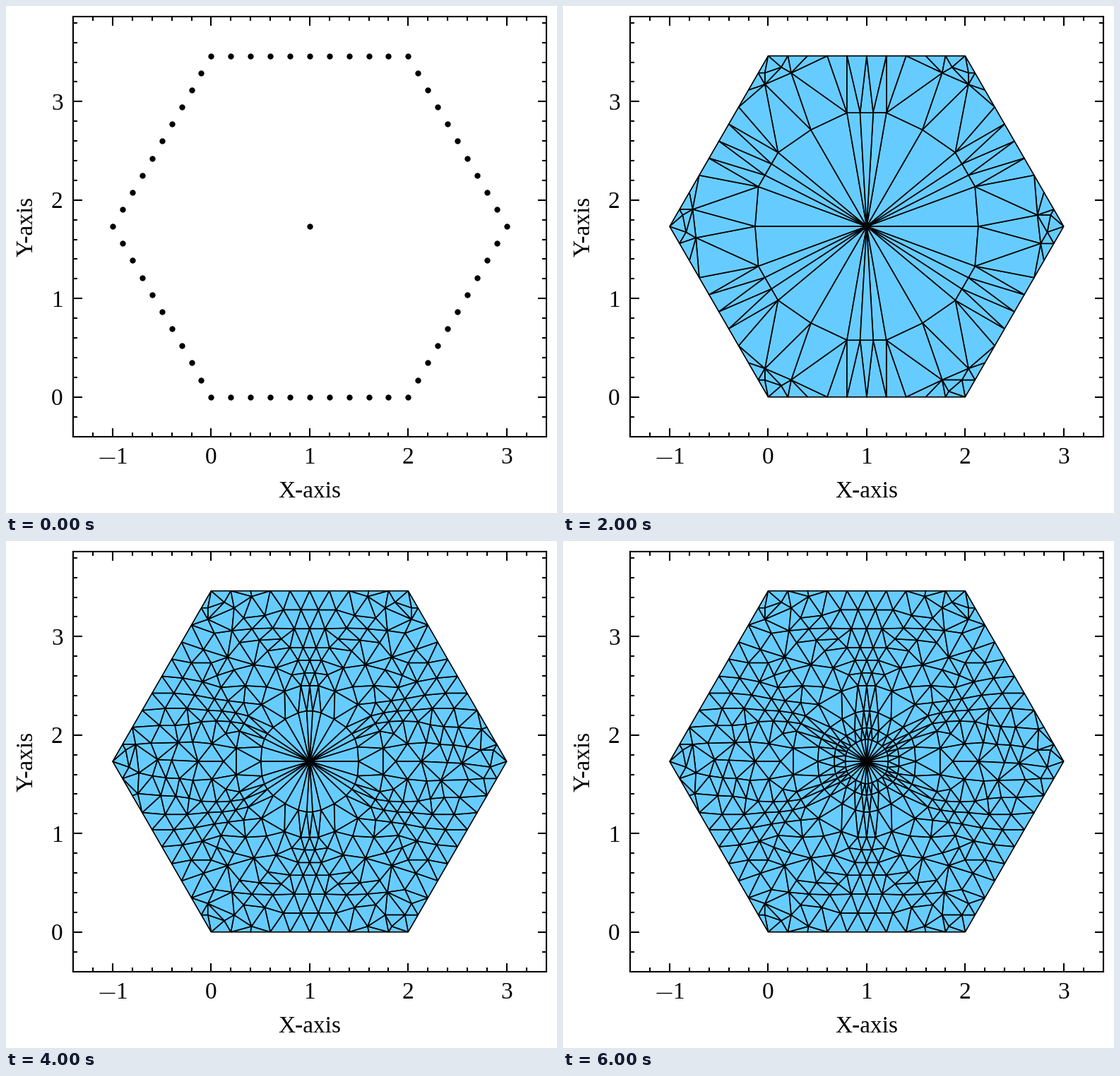
Animation of 780x718 px, one loop 7 s. Source, as a matplotlib script:

```python
import numpy as np
import matplotlib.pyplot as plt
from matplotlib.animation import FuncAnimation
from matplotlib.collections import PolyCollection
from matplotlib.lines import Line2D
from matplotlib.tri import Triangulation

W, H, DPI = 780, 718, 300
SCALE = 139.45            # pixels per data unit
LEFT, BOTTOM = 95.2, 609.5
ROOT3 = np.sqrt(3)
XLIM, YLIM = (-1.4, 3.4), (-0.4, 2 * ROOT3 + 0.4)
SPACING = 0.2
SIDE = 10                 # boundary points per hexagon side
# Diagonals chosen in the two tied trapezoids at each corner
DIAGONALS = ["--", "-+", "+-", "--", "++", "--"]


def seed_points():
    """Hexagon outline, bulged a hair so it stays strictly convex, and its centre."""
    angle = np.radians(240 + 60 * np.arange(7))
    corners = np.c_[1 + 2 * np.cos(angle), ROOT3 + 2 * np.sin(angle)]
    t = np.arange(SIDE)[:, None] / SIDE
    centre = np.array([1, ROOT3])
    sides = []
    for a, b in zip(corners[:-1], corners[1:]):
        out = (a + b) / 2 - centre
        sides.append(a + (b - a) * t + 1e-6 * out * t * (1 - t))
    return np.vstack(sides + [centre])


def first_mesh():
    """Fan around the centre, zigzag strips in the corners."""
    n = 6 * SIDE
    tris = []
    for k, choice in enumerate(DIAGONALS):
        c = k * SIDE

        def at(j):
            return (c + j) % n

        tris.append((at(0), at(1), at(-1)))
        for j, sign in enumerate(choice, start=1):
            s = 1 if sign == "+" else -1
            near, far = at(-s * j), at(s * (j + 1))
            tris.append((near, far, at(s * j)))
            tris.append((near, far, at(-s * (j + 1))))
        tris.append((n, at(-3), at(3)))
        tris += [(n, at(j), at(j + 1)) for j in range(3, 7)]
    return np.array(tris)


def refine(points, tris):
    """Add the centroid of each triangle that reaches too far, then triangulate."""
    corners = points[tris]
    mid = corners.mean(axis=1)
    reach = np.linalg.norm(corners - mid[:, None], axis=2).max(axis=1)
    points = np.vstack([points, mid[reach > SPACING]])
    return points, Triangulation(points[:, 0], points[:, 1]).triangles


points, tris = seed_points(), first_mesh()
seeds = points
meshes = [points[tris]]
for _ in range(5):
    points, tris = refine(points, tris)
    meshes.append(points[tris])

plt.rcParams["font.family"] = "Liberation Serif"
plt.rcParams["font.size"] = 8
fig = plt.figure(figsize=(W / DPI, H / DPI), dpi=DPI, facecolor="white")
width, height = SCALE * np.ptp(XLIM), SCALE * np.ptp(YLIM)
ax = fig.add_axes([LEFT / W, 1 - BOTTOM / H, width / W, height / H])
ax.set(xlim=XLIM, ylim=YLIM)
ax.set_xticks(range(-1, 4))
ax.set_yticks(range(4))
ax.set_xticks(np.arange(-6, 17) * 0.2, minor=True)
ax.set_yticks(np.arange(-1, 20) * 0.2, minor=True)
for kind, size in (("major", 3), ("minor", 1.5)):
    ax.tick_params(which=kind, direction="in", length=size, width=0.5,
                   top=True, right=True, labelbottom=False, labelleft=False)
for spine in ax.spines.values():
    spine.set_linewidth(0.5)


def label(x, y, text, **kw):
    fig.text(x / W, 1 - y / H, text, va="baseline", **{"ha": "center", **kw})


def px(x):
    return LEFT + (x - XLIM[0]) * SCALE


def py(y):
    return BOTTOM - (y - YLIM[0]) * SCALE


for v in range(4):
    label(px(v), 648, str(v))
    label(80.5, py(v) + 11.3, str(v), ha="right")
label(px(-1) + 12.8, 648, "1")
minus = np.array([131.5, 153.8]) / W
fig.add_artist(Line2D(minus, [1 - 639.5 / H] * 2, color="k", lw=0.34,
                      solid_capstyle="butt"))
label(px(1), 695.5, "X-axis")
label(37.5, py(ROOT3), "Y-axis", rotation=90, rotation_mode="anchor")

dots, = ax.plot(*seeds.T, "o", color="k", ms=2, mew=0)
mesh = PolyCollection([], facecolor="#66CCFF", edgecolor="k",
                      linewidth=0.4, joinstyle="miter")
ax.add_collection(mesh, autolim=False)


def draw(i):
    dots.set_visible(i == 0)
    mesh.set_verts(meshes[i - 1] if i else [])
    return dots, mesh


anim = FuncAnimation(fig, draw, frames=len(meshes) + 1, interval=1000,
                     repeat=True, repeat_delay=0)
plt.show()
```
